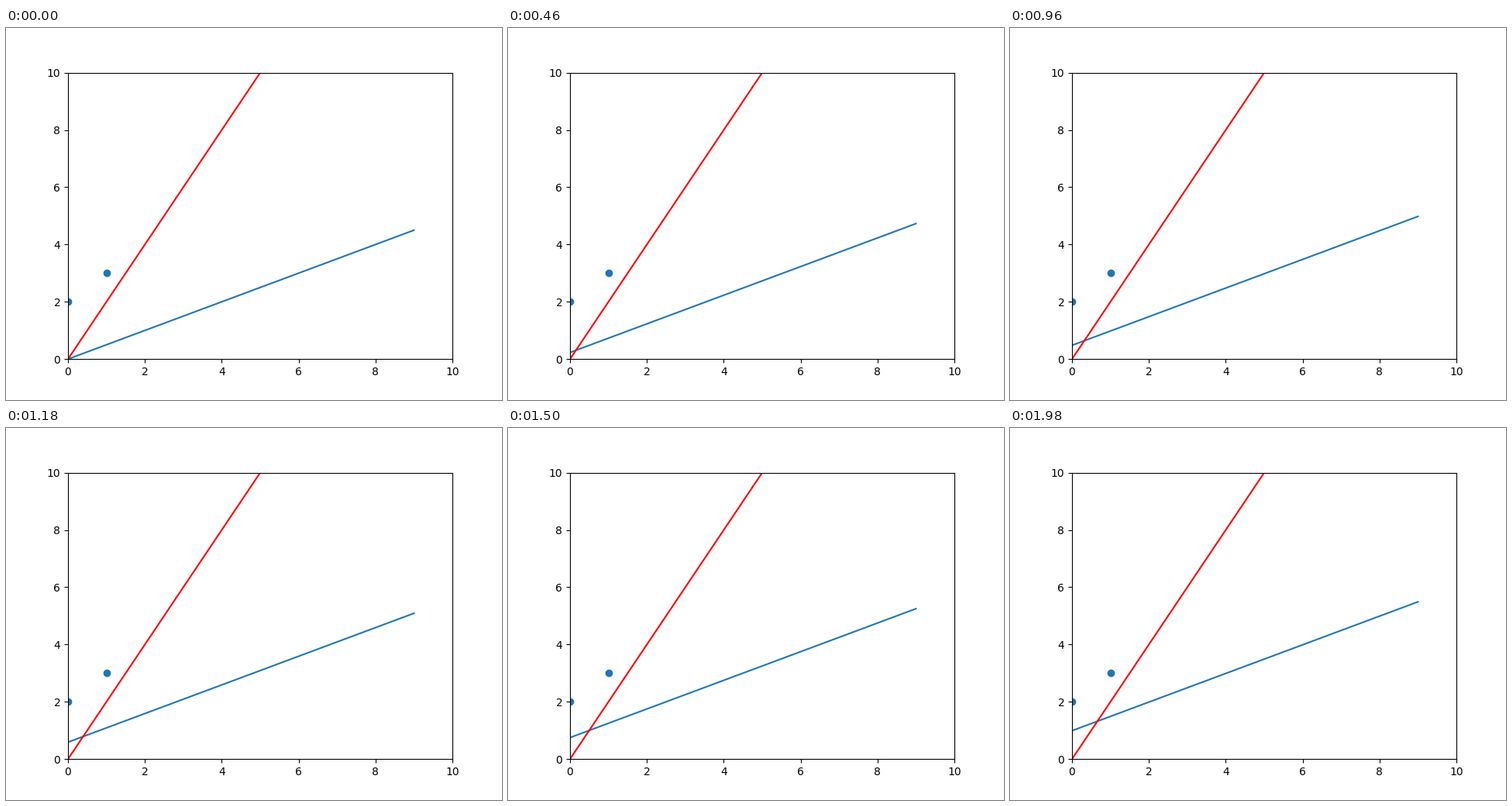
These frames come from a looping animation (640x480 px, 2000 ms). A matplotlib script:

```python
import matplotlib.pyplot as plt
import numpy as np
from matplotlib.animation import FuncAnimation

FRAMES = 100
INTERVAL = 20  # ms

plt.rcParams["font.family"] = "DejaVu Sans"

fig, ax = plt.subplots(figsize=(6.4, 4.8), dpi=100)
ax.set_xlim(0, 10)
ax.set_ylim(0, 10)

x = np.arange(10)
ax.scatter([0, 1], [2, 3], color="tab:blue")
line, = ax.plot(x, 0.5 * x, color="tab:blue")
ax.plot(x, 2 * x, color="red")


def update(i):
    """Raise the blue line's intercept steadily, keeping its slope."""
    line.set_ydata(0.5 * x + i / FRAMES)
    return line,


anim = FuncAnimation(fig, update, frames=FRAMES, interval=INTERVAL,
                     repeat=True, repeat_delay=0)
plt.show()
```
